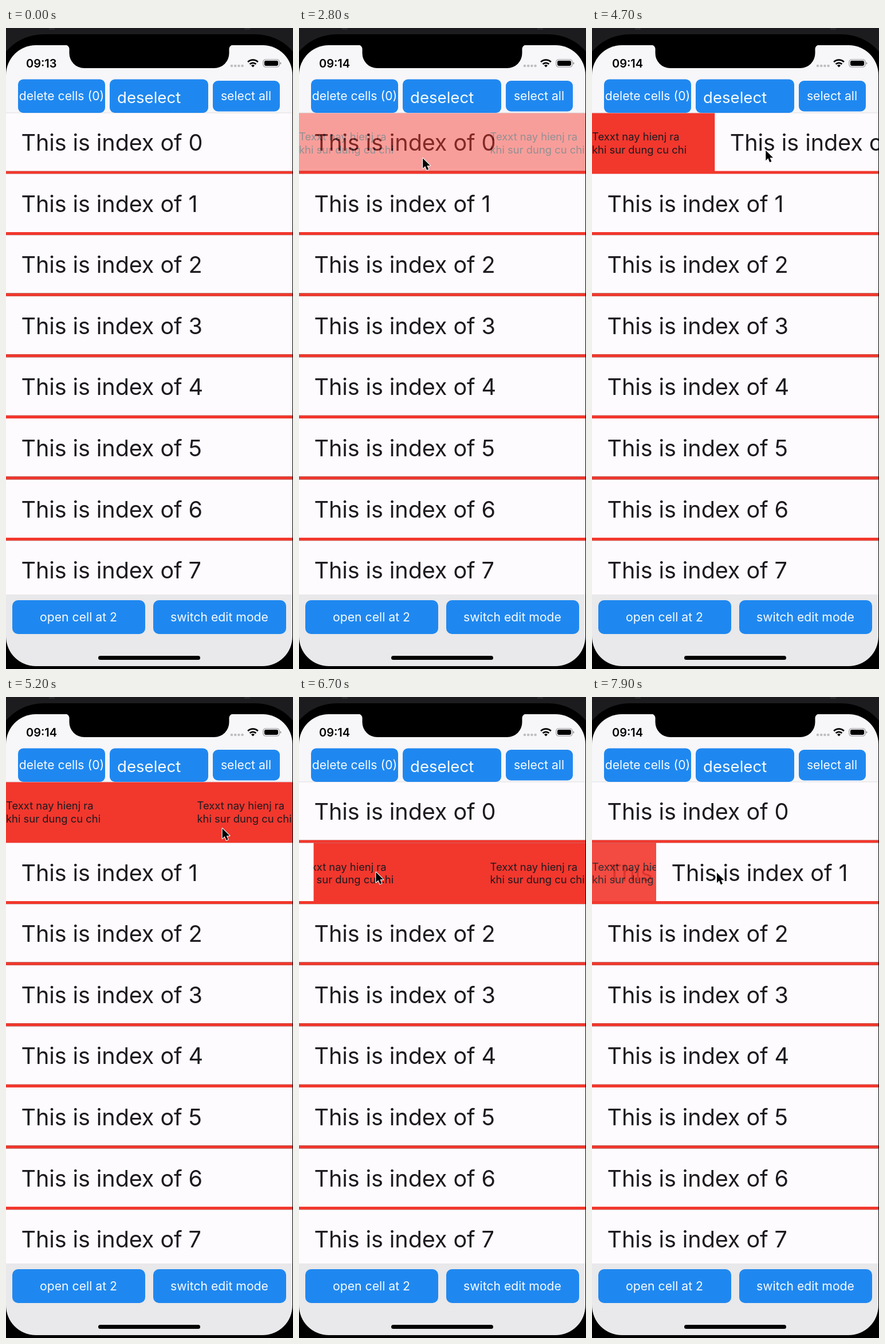
Write an HTML page that moves like this. It is 501 by 1118 pixels and loops after 8 s.

```html
<!DOCTYPE html>
<html lang="en">
<head>
<meta charset="utf-8">
<title>Swipe list</title>
<style>
  html, body { margin: 0; width: 100%; height: 100%; overflow: hidden; background: #000; }
  svg { display: block; width: 501px; height: 1118px; font-family: Inter, "Liberation Sans", sans-serif; }
  text { white-space: pre; }
  .row { font-size: 39.6px; letter-spacing: -.1px; fill: #1d1b20; }
  .hint { font-size: 18.4px; fill: #1d1b20; }
  .button rect { fill: #1f88f0; }
  .button text { font-size: 21.2px; fill: #f8fbff; text-anchor: middle; }
  .button .large { font-size: 27.6px; text-anchor: start; }
  .clock { font-size: 20px; font-weight: 600; }
  .paper { fill: #fefbfe; }
  .red { fill: #f2372d; }
</style>
</head>
<body>
<svg viewBox="0 0 501 1118">
  <defs>
    <clipPath id="screen"><rect y="30" width="500" height="1083" rx="52"/></clipPath>
    <clipPath id="viewport"><rect y="148" width="500" height="840"/></clipPath>
  </defs>

  <rect width="501" height="1118" fill="#1c1c1e"/>
  <path d="M75 0h10v3h-10zM416 0h10v3h-10z" fill="#2b2b2d"/>
  <rect x="-20" y="11" width="541" height="1150" rx="85"/>

  <g clip-path="url(#screen)">
    <rect y="30" width="500" height="118" fill="#f7f6f9"/>
    <g id="list" clip-path="url(#viewport)"></g>
    <rect y="147.5" width="500" height="1" fill="#dedde0"/>
    <rect y="988" width="500" height="130" fill="#e9e8ea"/>

    <g class="button">
      <rect x="21" y="89.5" width="152" height="58.5" rx="9"/>
      <text x="97" y="126">delete cells (0)</text>
      <rect x="181" y="89.5" width="172" height="58.5" rx="9"/>
      <text class="large" x="194" y="130.5">deselect</text>
      <rect x="361" y="92" width="117" height="53.5" rx="9"/>
      <text x="419" y="126">select all</text>
      <rect x="11" y="998" width="232" height="59" rx="10"/>
      <text x="126.5" y="1035">open cell at 2</text>
      <rect x="257" y="998" width="232" height="59" rx="10"/>
      <text x="372.5" y="1035">switch edit mode</text>
    </g>

    <text class="clock" id="clock" x="35" y="68.5">09:13</text>
    <path d="M394 66h19" stroke="#bfbec1" stroke-width="4.6" stroke-linecap="round" stroke-dasharray="0 6.2"/>
    <g fill="none" stroke="#000" stroke-width="2.9">
      <path d="M422.2 59.2a12.6 12.6 0 0 1 17.6 0"/>
      <path d="M425.6 63a7.8 7.8 0 0 1 10.8 0"/>
    </g>
    <path d="M431 68.6l-3-3.1a4.3 4.3 0 0 1 6 0z"/>
    <rect x="449" y="55" width="28" height="13" rx="4" fill="none" stroke="#8f8e91" stroke-width="1.2"/>
    <rect x="451" y="57" width="24" height="9" rx="2.4"/>
    <path d="M478.5 59.3q2 .7 2 2.2t-2 2.2z" fill="#8f8e91"/>
    <rect x="161" y="1095" width="178" height="7" rx="3.5"/>
  </g>
  <path d="M102 29A8 8 0 0 1 110.5 38V44A26 26 0 0 0 136.5 70H363.5A26 26 0 0 0 389.5 44V38A8 8 0 0 1 398 29Z"/>

  <g id="cursor">
    <path transform="translate(1 1.5) scale(.9)" d="M0 0V19.6L4.5 15.4 7.7 23 11.2 21.5 8 14.2H14.2Z" stroke="#fff" stroke-width="2.4" stroke-linejoin="round" paint-order="stroke"/>
  </g>
</svg>

<script>
const LOOP = 8000, TICK = 100;
const WIDTH = 501, PITCH = 106.6, CARD = 101.4;
const ENTER = 300, ENTER_TIME = 300, NEW_MINUTE = 1200;
const DRAG = 600, FLING = 300, FADE_IN = 300, FADE_OUT = 400, HOLD = 1000;

// The pointer drags a card from one x to another, then lets it fly off.
const swipes = [
  { row: 0, start: 1590, from: 420, to: 270, y: 228 },
  { row: 0, start: 4215, from: 88, to: 416, y: 212 },
  { row: 1, start: 5980, from: 297, to: 137, y: 304 },
  { row: 1, start: 7630, from: 105, to: 658, y: 305 }
];

const $ = id => document.getElementById(id);
const clamp = v => Math.min(1, Math.max(0, v));
const mix = (a, b, p) => a + (b - a) * p;

const label = i => `<text class="row" x="26.5" y="66">This is index of ${i}</text>`;
const paper = `<rect class="paper" width="500" height="${CARD}"/>`;
const hint = x =>
  `<text class="hint" x="${x}" y="48">Texxt nay hienj ra</text>
   <text class="hint" x="${x}" y="70.5">khi sur dung cu chi</text>`;

function row(i) {
  const face = paper + label(i);
  const swipe = swipes.some(s => s.row === i) ? `
    <g id="back${i}"><rect class="red" width="500" height="${PITCH}"/>${hint(0)}${hint(333.5)}</g>
    <g id="card${i}">${face}</g>` : '';
  return `<g transform="translate(0 ${148 + PITCH * i})">
    ${face}<rect class="red" y="${CARD}" width="500" height="${PITCH - CARD}"/>${swipe}</g>`;
}
$('list').innerHTML = Array.from({ length: 8 }, (_, i) => row(i)).join('');

const dragged = (s, age) => (s.to - s.from) * clamp(age / DRAG) ** 2;

function drawRow(i, t) {
  const s = swipes.findLast(s => s.row === i && s.start <= t);
  let shift = 0, red = 0;
  if (s) {
    const age = t - s.start;
    const fling = 1 - (1 - clamp((age - DRAG) / FLING)) ** 5;
    const exit = Math.sign(s.to - s.from) * WIDTH;
    if (age < HOLD + FADE_OUT) shift = mix(dragged(s, age), exit, fling);
    red = clamp(age / FADE_IN) - clamp((age - HOLD) / FADE_OUT);
  }
  $('card' + i).setAttribute('transform', `translate(${shift} 0)`);
  $('back' + i).setAttribute('opacity', red);
}

function pointer(t) {
  const n = swipes.findLastIndex(s => s.start <= t);
  const s = swipes[n], next = swipes[n + 1];
  if (!s) {
    const p = clamp((t - ENTER) / ENTER_TIME);
    return [mix(480, next.from, p), mix(10, next.y, p)];
  }
  const release = s.start + DRAG;
  const x = s.from + dragged(s, t - s.start);
  if (t < release || !next) return [x, s.y];
  const p = (t - release) / (next.start - release);
  return [mix(x, next.from, p), mix(s.y, next.y, p ** 1.6)];
}

function draw() {
  const t = Math.floor(performance.now() / TICK + .1) * TICK % LOOP;
  for (const i of new Set(swipes.map(s => s.row))) drawRow(i, t);
  $('cursor').setAttribute('transform', `translate(${pointer(t)})`);
  $('cursor').setAttribute('opacity', t < ENTER ? 0 : 1);
  $('clock').textContent = t < NEW_MINUTE ? '09:13' : '09:14';
  requestAnimationFrame(draw);
}
draw();
</script>
</body>
</html>
```
